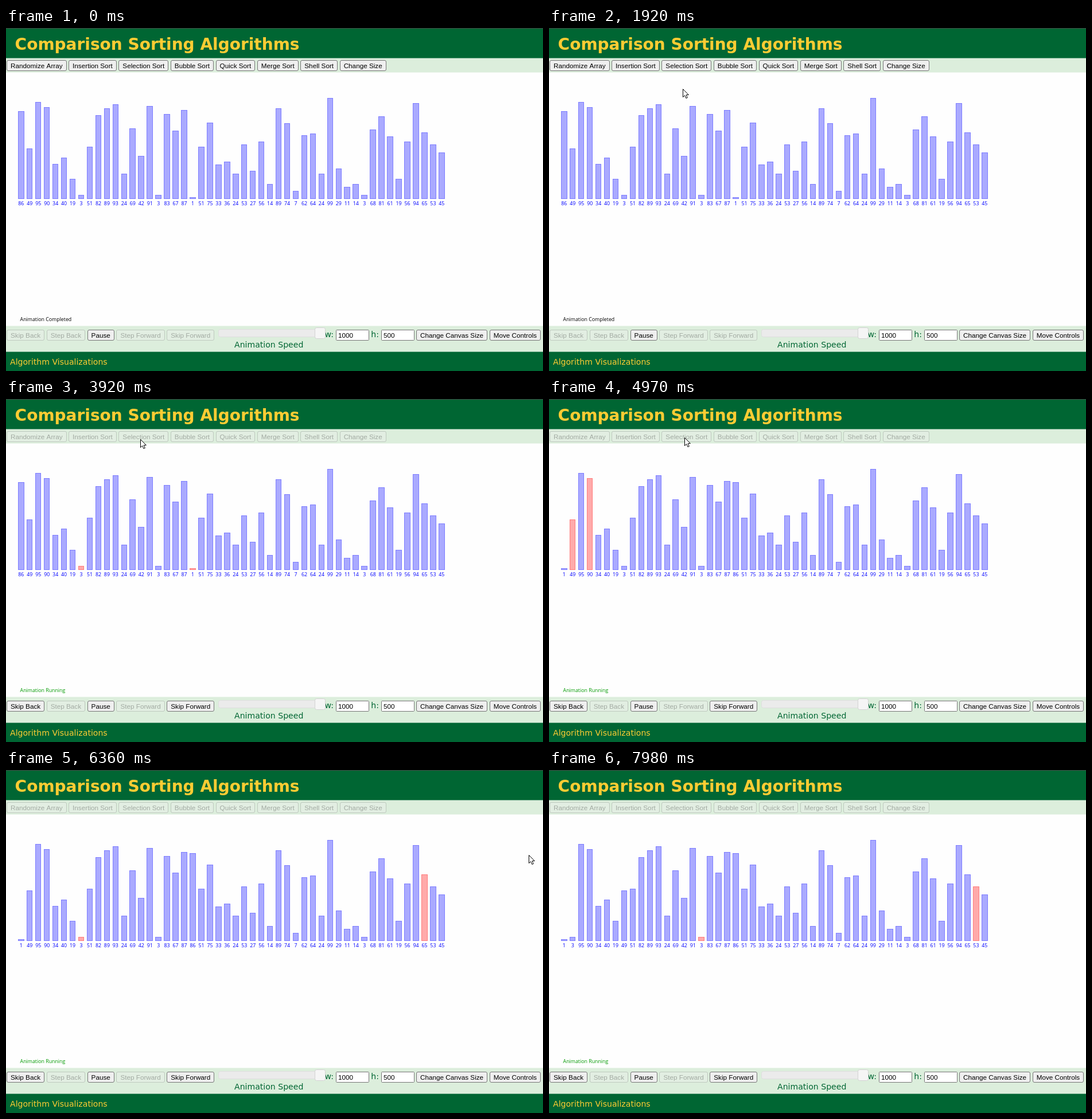
An HTML page with a canvas for the animation above (8 s loop, 936 by 598 pixels).

```html
<!DOCTYPE html>
<html lang="en">
<head>
<meta charset="utf-8">
<title>Comparison Sorting Algorithms</title>
<style>
  html, body { margin: 0; width: 100%; height: 100%; overflow: hidden; }
  canvas { display: block; }
</style>
</head>
<body>
<canvas id="stage" width="936" height="598"></canvas>
<script>
const ctx = document.getElementById('stage').getContext('2d');
const LOOP = 8000, TICK = 70, ZOOM = .88;
const SORT_START = 3305, COMPARE = 32, SWAP = 52;
const RUN_AT = 3290, POINTER_IN = 130, POINTER_OUT = 6440;
const GREEN = '#006633', GOLD = '#ffcc33', PALE = '#dceedc', PAPER = '#fefefe';
const UI = `${13.333 * ZOOM}px "Liberation Sans", Arial, sans-serif`;
const BODY = `${16 * ZOOM}px "DejaVu Sans", Verdana, sans-serif`;
const TITLE = 'bold 28px "DejaVu Sans", Verdana, sans-serif';
const SMALL = `${10 * ZOOM}px "Open Sans", "Noto Sans", sans-serif`;

// the numbers printed under the bars
const values = [
  86, 49, 95, 90, 34, 40, 19, 3, 51, 82, 89, 93, 24, 69, 42, 91, 3, 83, 67, 87, 1, 51, 75, 33, 36,
  24, 53, 27, 56, 14, 89, 74, 7, 62, 64, 24, 99, 29, 11, 14, 3, 68, 81, 61, 19, 56, 94, 65, 53, 45];

const sorts = ['Randomize Array', 'Insertion Sort', 'Selection Sort', 'Bubble Sort',
  'Quick Sort', 'Merge Sort', 'Shell Sort', 'Change Size'];
const playback = ['Skip Back', 'Step Back', 'Pause', 'Step Forward', 'Skip Forward'];
const layout = ['Change Canvas Size', 'Move Controls'];

const entry = { x: 893, y: 590 };
const moves = [
  { from: 130, to: 870, x: 529, y: 464 },
  { from: 1140, to: 1920, x: 233, y: 106 },
  { from: 2120, to: 2820, x: 234, y: 70 },
  { from: 4060, to: 4900, x: 236, y: 67 },
  { from: 5110, to: 5390, x: 590, y: 23 },
  { from: 5390, to: 5880, x: 911, y: 148 }];

function text(str, x, y, font, color, align = 'left') {
  ctx.font = font;
  ctx.fillStyle = color;
  ctx.textAlign = align;
  ctx.fillText(str, x, y);
}

function rect(x, y, w, h, color) {
  ctx.fillStyle = color;
  ctx.fillRect(x, y, w, h);
}

function box(x, y, w, h, fill, line, radius) {
  ctx.beginPath();
  ctx.roundRect(x + .5, y + .5, w - 1, h - 1, radius);
  ctx.fillStyle = fill;
  ctx.fill();
  ctx.strokeStyle = line;
  ctx.lineWidth = 1;
  ctx.stroke();
}

function pointerAt(t) {
  if (t < POINTER_IN || t >= POINTER_OUT) return null;
  let { x, y } = entry;
  for (const move of moves) {
    const k = Math.min(1, Math.max(0, (t - move.from) / (move.to - move.from)));
    const eased = k * (2 - k);
    x += (move.x - x) * eased;
    y += (move.y - y) * eased;
  }
  return { x: Math.round(x), y: Math.round(y) };
}

// Buttons flow from left to right, as wide as their labels
function drawRow(labels, x, y, isEnabled, pointer) {
  for (const label of labels) {
    ctx.font = UI;
    const width = ctx.measureText(label).width + 16 * ZOOM;
    const enabled = isEnabled(label), left = Math.round(x), right = Math.round(x + width);
    const hover = enabled && pointer && pointer.x >= left && pointer.x < right &&
      pointer.y >= y && pointer.y < y + 19;
    const fill = !enabled ? 'rgba(239,239,239,.3)' : hover ? '#e5e5e5' : '#efefef';
    const line = !enabled ? 'rgba(118,118,118,.3)' : hover ? '#4f4f4f' : '#767676';
    box(left, y, right - left, 19, fill, line, 2.5);
    text(label, x + width / 2, y + 13.5, UI, enabled ? '#000' : 'rgba(16,16,16,.3)', 'center');
    x += width + 3.45;
  }
}

// Selection sort replayed up to time t
function sortState(t) {
  const bars = values.slice(), last = bars.length - 1;
  let start = SORT_START;
  for (let i = 0; i < last && t >= start; i++) {
    const current = i + 1 + Math.floor((t - start) / COMPARE);
    let min = i;
    for (let j = i + 1; j <= Math.min(current - 1, last); j++) {
      if (bars[j] < bars[min]) min = j;
    }
    if (current <= last) return { bars, marked: [min, current] };
    [bars[i], bars[min]] = [bars[min], bars[i]];
    start += (last - i) * COMPARE + SWAP;
  }
  return { bars, marked: [] };
}

function drawBars({ bars, marked }) {
  bars.forEach((value, i) => {
    const x = 21 + 17 * ZOOM * i, left = Math.round(x), width = Math.round(x + 10.5) - left;
    const top = Math.round(296.5 - 2 * ZOOM * value), height = 298 - top;
    const red = marked.includes(i);
    rect(left, top, width, height, red ? '#ff7c7c' : '#7c7cff');
    rect(left + 1, top + 1, width - 2, height - 2, red ? '#ffaaaa' : '#aaaaff');
    text(value, x + 5.3, 309, SMALL, '#0000ff', 'center');
  });
}

function drawPointer({ x, y }) {
  ctx.save();
  ctx.translate(x + .5, y + .5);
  const arrow = new Path2D('M0 0V14L3.2 11L5.4 16L7.8 15L5.6 10.2L9.8 10Z');
  ctx.fillStyle = '#fff';
  ctx.fill(arrow);
  ctx.strokeStyle = '#000';
  ctx.lineWidth = 1;
  ctx.stroke(arrow);
  ctx.restore();
}

function drawField(label, value, x) {
  text(label, x - 4, 539, BODY, GREEN, 'right');
  box(x, 526, 58, 19, '#fff', '#767676', 1);
  text(value, x + 4, 539.5, UI, '#000');
}

function drawControls(running, pointer) {
  drawRow(sorts, 1, 56, () => !running, pointer);
  drawRow(playback, 1, 526, s => s === 'Pause' || running && s.startsWith('Skip'), pointer);
  drawRow(layout, 715, 526, () => true, pointer);
  drawField('w:', 1000, 575);
  drawField('h:', 500, 654);
  box(370, 525, 187, 14, '#ebebeb', '#dedede', 3);
  box(538, 522, 19, 20, '#f5f5f5', '#d2d2d2', 3);
  text('Animation Speed', 398, 556.5, BODY, GREEN);
}

function draw(t) {
  const pointer = pointerAt(t), running = t >= RUN_AT;
  rect(0, 0, 936, 598, PAPER);
  rect(0, 53, 936, 24.5, PALE);
  rect(0, 0, 936, 52.6, GREEN);
  rect(0, 0, 936, 1, '#444444');
  rect(0, 519.5, 936, 45, PALE);
  rect(0, 564.5, 936, 33.5, GREEN);
  text('Comparison Sorting Algorithms', 15.6, 37.5, TITLE, GOLD);
  text('Algorithm Visualizations', 7, 587, BODY, GOLD);
  drawControls(running, pointer);
  drawBars(sortState(t));
  text(running ? 'Animation Running' : 'Animation Completed', 24.6, 511, SMALL, running ? '#009900' : '#000');
  if (pointer) drawPointer(pointer);
}

function frame(now) {
  const t = now % LOOP;
  // the sort is seen at a coarse, steady rate
  draw(t < SORT_START - TICK ? t : Math.floor((t + 10) / TICK) * TICK);
  requestAnimationFrame(frame);
}
requestAnimationFrame(frame);
</script>
</body>
</html>
```
